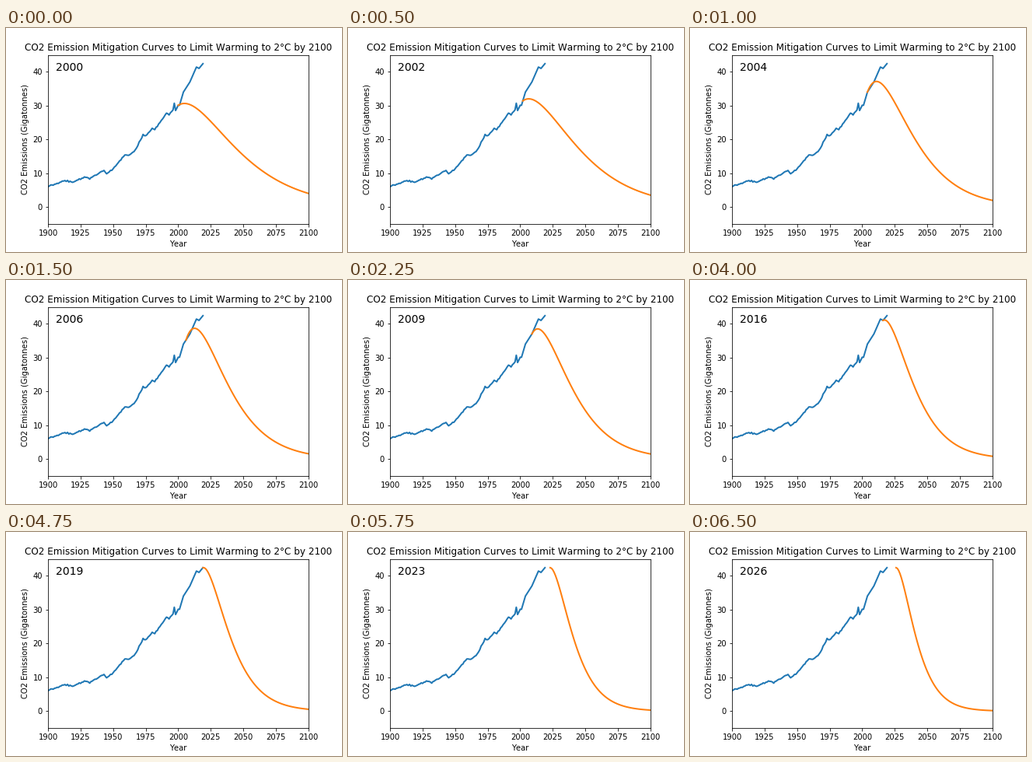
Recreate the animation shown at these times as a matplotlib script. Size 432x288 px, loop 6750 ms.

```python
import matplotlib.pyplot as plt
import numpy as np
from matplotlib.animation import FuncAnimation

FIRST_START, LAST_START, END_YEAR = 2000, 2026, 2100
BUDGET = 1795  # Gt of CO2 left at the start of 2000

# Turning points of the emission history: (year, Gt)
HISTORY = [
    (1900, 6.1), (1913, 7.8), (1919, 7.4), (1929, 9.0), (1932, 8.4),
    (1943, 10.9), (1945, 9.9), (1949, 10.9), (1959, 15.4), (1962, 15.2),
    (1967, 16.8), (1973, 21.3), (1975, 21.0), (1980, 23.4), (1982, 22.8),
    (1991, 27.9), (1993, 27.3), (1996, 28.7), (1997, 30.6), (1998, 28.5),
    (2000, 30.1), (2001, 30.1), (2004, 34.0), (2009, 37.0), (2014, 41.4),
    (2016, 41.0), (2019, 42.4),
]
# Turning points of the recent growth rate: (year, rate)
GROWTH = [(2000, 0.008), (2002, 0.009), (2004, 0.030), (2006, 0.034),
          (2009, 0.020), (2013, 0.020), (2016, 0.006), (2021, 0)]


def between(points, year):
    return np.interp(year, *zip(*points))


def mitigation_curve(start):
    """Emissions from start onwards that use up exactly the remaining budget."""
    level = between(HISTORY, start)
    growth = between(GROWTH, start)
    spent = between(HISTORY, np.arange(FIRST_START, start)).sum()
    lifetime = (BUDGET - spent) / level
    decay = (1 + np.sqrt(1 + growth * lifetime)) / lifetime
    t = np.arange(END_YEAR - start + 1)
    return start + t, level * (1 + (growth + decay) * t) * np.exp(-decay * t)


# Kern letter pairs in whole pixels
plt.rcParams["text.kerning_factor"] = 6

fig = plt.figure(figsize=(6, 4), dpi=72, facecolor="white")
fig.subplots_adjust(left=0.125, right=0.9, bottom=0.125, top=0.88)
ax = fig.add_subplot()
ax.set(xlim=(1900, END_YEAR), ylim=(-5, 45),
       xlabel="Year", ylabel="CO2 Emissions (Gigatonnes)",
       title="CO2 Emission Mitigation Curves to Limit Warming to 2°C by 2100")
ax.set_xticks(range(1900, END_YEAR + 1, 25))
ax.set_yticks(range(0, 41, 10))

years = np.arange(1900, 2020)
jitter = np.random.default_rng(4).normal(0, 0.1, len(years))
emissions = between(HISTORY, years) + jitter * (years < FIRST_START)
ax.plot(years, emissions, color="tab:blue", lw=2)
curve, = ax.plot([], [], color="tab:orange", lw=2)
year_label = ax.text(0.03, 0.905, "", transform=ax.transAxes, fontsize=14)


def update(frame):
    start = FIRST_START + frame
    curve.set_data(*mitigation_curve(start))
    year_label.set_text(str(start))
    return curve, year_label


animation = FuncAnimation(fig, update, frames=LAST_START - FIRST_START + 1,
                          interval=250, repeat=True, repeat_delay=0)
plt.show()
```
